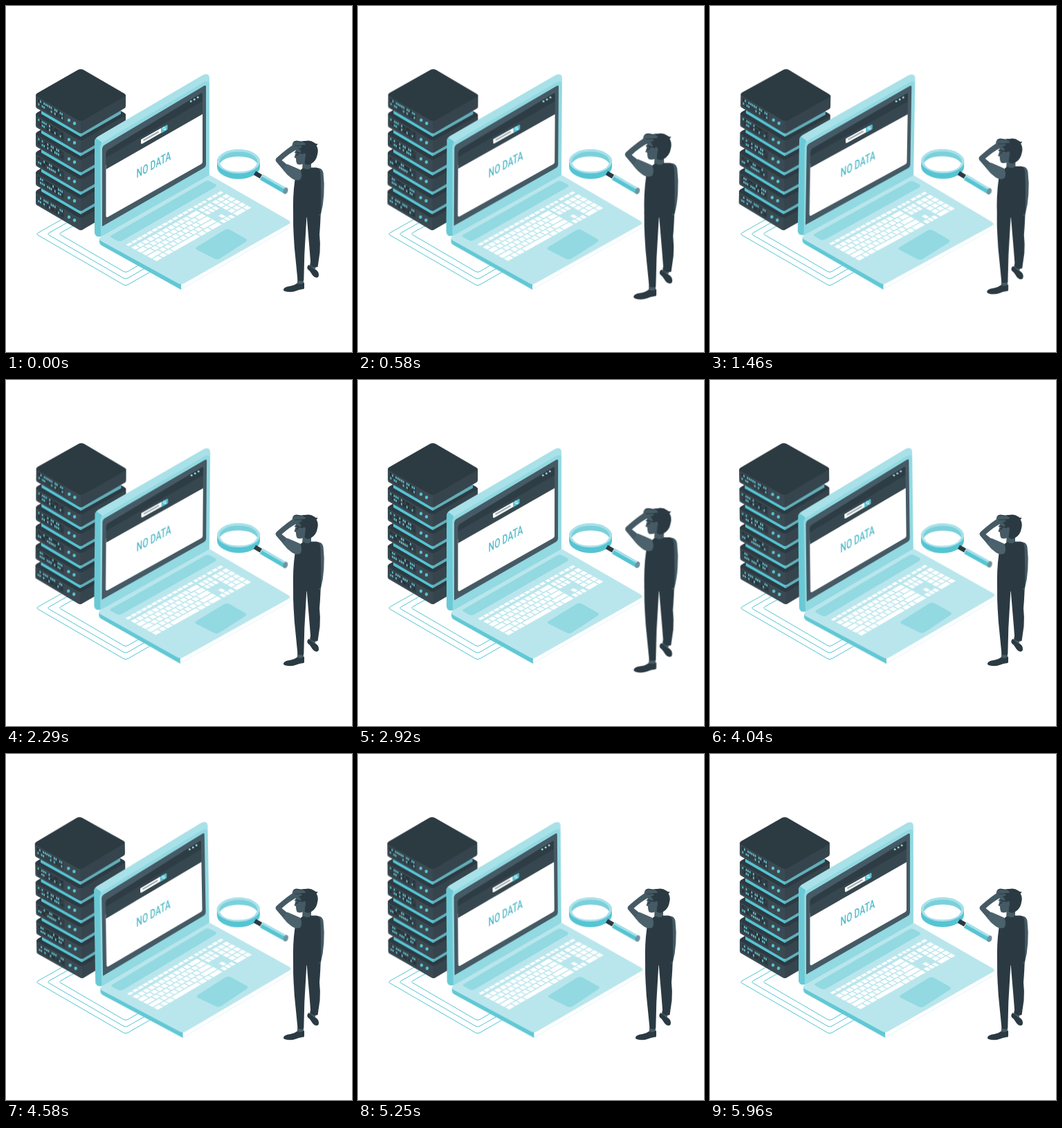
Recreate the animation shown at these times as an HTML page. Size 500 by 500 pixels, loop 6 s.

```html
<!DOCTYPE html>
<html lang="en">
<head>
<meta charset="utf-8">
<title>No data</title>
<style>
  html, body { margin: 0; width: 100%; height: 100%; overflow: hidden; background: #fff; }
  svg { display: block; width: 100%; height: 100%; }
  .sway { animation: sway 6s linear infinite; }
  #servers { transform-origin: 108px 207.5px; }
  #laptop { transform-origin: 269px 254px; }
  #lens { transform-origin: 356px 239px; }
  #person { transform-origin: 429.5px 304px; animation: beat 6s linear infinite; }
  @keyframes sway {
    0%, 100% { transform: rotate(0deg); }
    25% { transform: rotate(1deg); }
    75% { transform: rotate(-1deg); }
  }
  @keyframes beat {
    0%, 30%, 40%, 60%, 100% { transform: scale(1); }
    10%, 50% { transform: scale(1.1); }
  }
  #label { font: 500 18px Roboto, "Liberation Sans", sans-serif; fill: #55bccb; }
  .dark { fill: #2b3a42; }
  .slate { fill: #37474f; }
  .skin { fill: #455a64; }
  .teal { fill: #56c4d3; }
  .mid { fill: #92d9e2; }
  .pale { fill: #b9e6ec; }
  .white { fill: #fff; }
</style>
</head>
<body>
<svg viewBox="0 0 500 500">
  <g id="cables" fill="none" stroke="#56c4d3" stroke-width="1">
    <path d="M84 306.500 L46 328 Q43.500 329.500 46 331 L170 402.800 Q173 404.500 176 402.800 L216 379.800"/>
    <path d="M92 311 L62 328 Q59.500 329.500 62 331 L170 393.300 Q173 395 176 393.300 L206 376"/>
    <path d="M100 316 L79 327.700 Q76.500 329.200 79 330.700 L170 383.700 Q173 385.300 176 383.700 L194 373.300"/>
  </g>

  <g id="servers" class="sway"></g>

  <g id="laptop" class="sway">
    <!-- base -->
    <path fill="#fff" stroke="#b9e6ec" stroke-width=".7" stroke-dasharray="2 1.500" d="M253 401 L411 312 L411 317 Q411 319 408 321 L253 409.500 Z"/>
    <path fill="#62c8d5" d="M135 336 L253 401 L253 410 L138 346 Q135 344 135 341 Z"/>
    <path class="pale" d="M138 333 L294 244 L408 309.500 Q413 312.500 408 315.500 L257 401 Q253 403 249 401 L137 339.500 Q132.500 336.500 138 333 Z"/>
    <path class="mid" d="M153 331 L287 254 Q291 251.500 295 253.500 L302 257 Q306 259.500 302 262 L168 339 Q164 341 160 339 L153 335 Q149 333 153 331 Z"/>
    <path class="mid" d="M276 348 L316 323.500 Q320 321.500 324 323.500 L346 336 Q350 338.500 346 341 L309 365 Q305 367 301 365 L276 352.500 Q272 350.500 276 348 Z"/>
    <g id="keys" class="white"></g>
    <!-- lid -->
    <path fill="#a9e1e9" d="M128 197 Q128 191.500 133 188.500 L284 100 Q294 95.500 294 105 L294 244 L140 332 Q128 336 128 326 Z"/>
    <path fill="#6ac9d5" d="M128 197 Q128 193 130 191 L138 196.500 L138 333 Q128 335 128 326 Z"/>
    <path class="mid" d="M136 205 Q136 199 141 196 L285 110.500 Q293 106 293.500 113 L293.500 244.500 L137 333.500 Z"/>
    <path class="skin" d="M139 206 Q139 203 142 201 L286 115.500 Q289 113.500 289 117 L289 229 Q289 232 286 234 L139 318.500 Z"/>
    <path class="white" d="M144.500 230 L284 150 L284 225 Q284 227.500 282 228.500 L147 305 Q144.500 306 144.500 303 Z"/>
    <path class="slate" d="M144.500 212 L284 129 L284 156.200 L144.500 236 Z"/>
    <path fill="#2e3d45" d="M144.500 213 Q144.500 210 147 208 L282 126 Q284 125 284 127.500 L284 137.500 L144.500 219 Z"/>
    <g fill="#8fd6df">
      <circle cx="267.200" cy="137.700" r="1.500"/>
      <circle cx="272.200" cy="134.900" r="1.500"/>
      <circle cx="277.200" cy="132.100" r="1.500"/>
    </g>
    <path class="white" d="M195 193 L224 176.500 L224 183.500 L197 199 Q195 200 195 198 Z"/>
    <path stroke="#a5b0b5" stroke-width="2.200" d="M198.500 194.300 L220.500 181.800"/>
    <path class="teal" d="M224 176.500 L231.500 172.200 Q233.500 171.200 233.500 173 L233.500 177.500 Q233.500 178.700 232 179.500 L224 184 Z"/>
    <g fill="none" stroke="#fff" stroke-width=".9">
      <ellipse cx="228.300" cy="176.800" rx="1.600" ry="1.900"/>
      <path d="M229.400 178.200 L231.200 179"/>
    </g>
    <text id="label" transform="matrix(.67 -.37 0 1 188.600 249)">NO DATA</text>
  </g>

  <g id="lens" class="sway">
    <path class="teal" d="M305 225 A31 17.500 0 0 1 367 225 L367 232.500 A31 17.500 0 0 1 305 232.500 Z"/>
    <ellipse cx="336" cy="224.500" rx="31" ry="17.500" fill="#a9e1e9"/>
    <ellipse cx="336" cy="225" rx="27.500" ry="14.500" fill="#7bd0db"/>
    <path class="white" d="M309 227.500 Q316 217.500 336 217.500 T363 227.500 Q358 239.500 336 239.500 T309 227.500 Z"/>
    <path d="M369 247.200 L403.500 267" stroke="#56c4d3" stroke-width="8.500"/>
    <path d="M370 244.700 L405 264.500" stroke="#a9e1e9" stroke-width="3"/>
    <path d="M359.500 241.300 L368.500 246.500" stroke="#2b3a42" stroke-width="6.500"/>
    <ellipse cx="404" cy="267" rx="3.300" ry="4.900" transform="rotate(20 404 267)" fill="#6f939d"/>
  </g>

  <g id="person">
    <!-- legs and shoes -->
    <path class="skin" d="M421.500 394 L430 394 L430 403 L420.500 403 Z M440 370 L448 372 L447 380 L438 378 Z"/>
    <path class="dark" d="M420.500 400.700 Q426 403.200 431 399.700 L431 407.200 Q431 409.200 428 409.200 Q423 409.700 419 411.700 Q411 414.700 403 412.200 Q399.500 410.700 402 407.700 Q405 405.200 411 404.700 Q417 403.700 420.500 400.700 Z"/>
    <path class="dark" d="M437.500 374 Q441 378 447 380.500 Q452 383.500 452 388.500 Q452 393 447.500 392.300 Q443.500 391 441 386 Q439 382.500 436 380.500 Q434 377 437.500 374 Z"/>
    <path class="dark" d="M433 290 L455 290 Q454.500 313 453 330 Q454.500 343 453.500 356 L450.500 377 Q445 378.500 440.500 375.500 L438.500 350 L434.800 306 Z"/>
    <path class="dark" d="M416.500 280 Q414 303 415.700 331 Q416.500 349 418.700 368 L421.500 396.500 Q426 398.500 430.300 396.500 L431.300 358 L434.300 306 L448 285 Z"/>
    <!-- neck, torso, hanging arm -->
    <path class="skin" d="M429 220 L441 222 L441 238 L428 238 Z"/>
    <path class="skin" d="M448 234 Q457 233 458.500 241 Q460.500 257 459.300 273 Q458.500 288 454.700 302 Q451 304 450.500 299 Z"/>
    <path class="dark" d="M424 240 Q426 234.500 431 234.500 Q436 238 441 233.500 L449 233.500 Q454.500 235 454.500 243 Q455.500 266 455 300 Q437 309 415.200 302 Q414 276 417.500 251 Z"/>
    <!-- head -->
    <g transform="translate(-.5 .6)">
      <path class="skin" d="M419.500 205 L418.500 214 L417 218.500 L419.500 219.500 Q419.500 226 421.500 228 Q426 229.500 431 227 L437 222 L436 203 Z"/>
      <path class="dark" d="M420 201 Q424 193.500 433 194.500 Q440 192.500 446 197 Q449 199.500 451 198 Q450.500 200.500 449 201 Q452.500 207 450.500 214 Q449 224 440 228.500 Q434.500 230 432 227 L433 218 L427 211 Q426 205 420 204.500 Z"/>
      <ellipse class="skin" cx="431" cy="215.500" rx="2.600" ry="3.600"/>
      <path d="M417.500 211 Q419 209.500 422.500 211 Q423.500 215.500 419 215 M422.500 211.500 L430 212.500" fill="none" stroke="#26343b" stroke-width="1.100"/>
    </g>
    <!-- raised arm -->
    <path class="skin" d="M418 199 Q407 205 391 219.500 Q388.500 222 390.500 225 L402 238.500 L408.500 231 L398.500 223 Q409 213 422 206.500 Z"/>
    <path class="skin" d="M413.500 201.500 Q414 194.500 420 194.500 L428 196 Q434 198.500 433 200.500 L426 201.500 Q429 204 426 205 L417 207 Z"/>
    <path d="M416 196.500 Q421 194.500 427 196.500 M417 202 L428 202" fill="none" stroke="#2b3a42" stroke-width=".9"/>
    <path fill="#4b626c" d="M406.500 228.500 Q415 232 425 236.500 Q429 244 425.500 250.500 Q420 253.500 413.500 249.500 Q406 244.500 401 237.500 Q402 231.500 406.500 228.500 Z"/>
  </g>
</svg>
<script>
  const put = (id, markup) => document.getElementById(id).innerHTML = markup;
  const poly = (points, fill) => `<polygon points="${points}"${fill ? ` fill="${fill}"` : ""}/>`;

  let seed = 11;
  const rand = () => (seed = (seed * 16807) % 2147483647) / 2147483647;

  // Status lights follow the slope of the front face.
  function lights() {
    let out = "";
    for (const row of [5, 10.5]) {
      for (let x = 46.5; x < 82; x += 2.6) {
        if (rand() < .22) continue;
        const y = 127.5 + (x - 43) * .58 + row;
        const fill = rand() < .72 ? "#68c4d0" : "#242f35";
        out += poly(`${x},${y} ${x + 1.7},${y + 1} ${x + 1.7},${y + 4.3} ${x},${y + 3.3}`, fill);
      }
    }
    return out;
  }

  function server(i) {
    const joint = i === 0 ? "" :
      poly("51,116 108,149 108,161 51,128", "#56c4d3") +
      poly("166,116 108,149 108,161 166,128", "#62aeb9");
    return `<g transform="translate(0 ${i * 28})">
      <path fill="#3b4a52" d="M43 128 L43 144.500 Q43 147 45 148 L104 182.500 Q106 184 108.500 184 L108.500 164 Z"/>
      <path fill="#36454d" d="M173 128 L173 144.500 Q173 147 171 148 L112 182.500 Q110 184 108 184 L108 164 Z"/>
      <path fill="#2c3a42" d="M45 126 L104 92.300 Q108 90 112 92.300 L171 126.500 Q174.500 129 171 131 L112 165 Q108 167 104 165 L45 131 Q41.500 128.500 45 126 Z"/>
      ${poly("45.5,133 84,155.500 84,168 45.5,145.500", "#323f47")}
      ${lights()}
      <ellipse class="teal" cx="91" cy="165" rx="2.200" ry="2.600"/>
      <ellipse class="teal" cx="99" cy="169.600" rx="2.200" ry="2.600"/>
      ${joint}</g>`;
  }
  put("servers", [5, 4, 3, 2, 1, 0].map(server).join(""));

  // u runs along a keyboard row (0-15), v across the rows (0-6).
  const at = (u, v) => `${172 + u * 9.2 + v * 7.6},${345 - u * 5.2 + v * 4.1}`;
  const key = (u, v, w = 1, h = 1) => {
    const a = u + .08, b = u + w - .08, c = v + .1, d = v + h - .1;
    return poly([at(a, c), at(b, c), at(b, d), at(a, d)].join(" "));
  };
  const unit = .8;
  const run = (n, w = 1) => Array(n).fill(w);
  // Key widths per row; negative widths are gaps.
  const rows = [
    [...run(13), -.2, ...run(3, .8), -.2, ...run(3)],
    [...run(11), 2, -.2, ...run(3, .8), -.2, ...run(3)],
    [1.5, ...run(10), 1.5, -.2, ...run(3, .8), -.2, ...run(3)],
    [1.8, ...run(9), 2.2, -2.8, ...run(3)],
    [2.3, ...run(8), 2.7, -1, .8, -1, ...run(3)],
    [1.3, 1, 1.2, 5.3, 1.2, 1, 2, -.2, ...run(3, .8), -.2, 2, 1]
  ];
  put("keys", rows.map((widths, v) => {
    let u = 0, out = "";
    for (const w of widths) {
      if (w > 0) out += key(u, v, w * unit, v ? 1 : .7);
      u += Math.abs(w) * unit;
    }
    return out;
  }).join(""));
</script>
</body>
</html>
```
